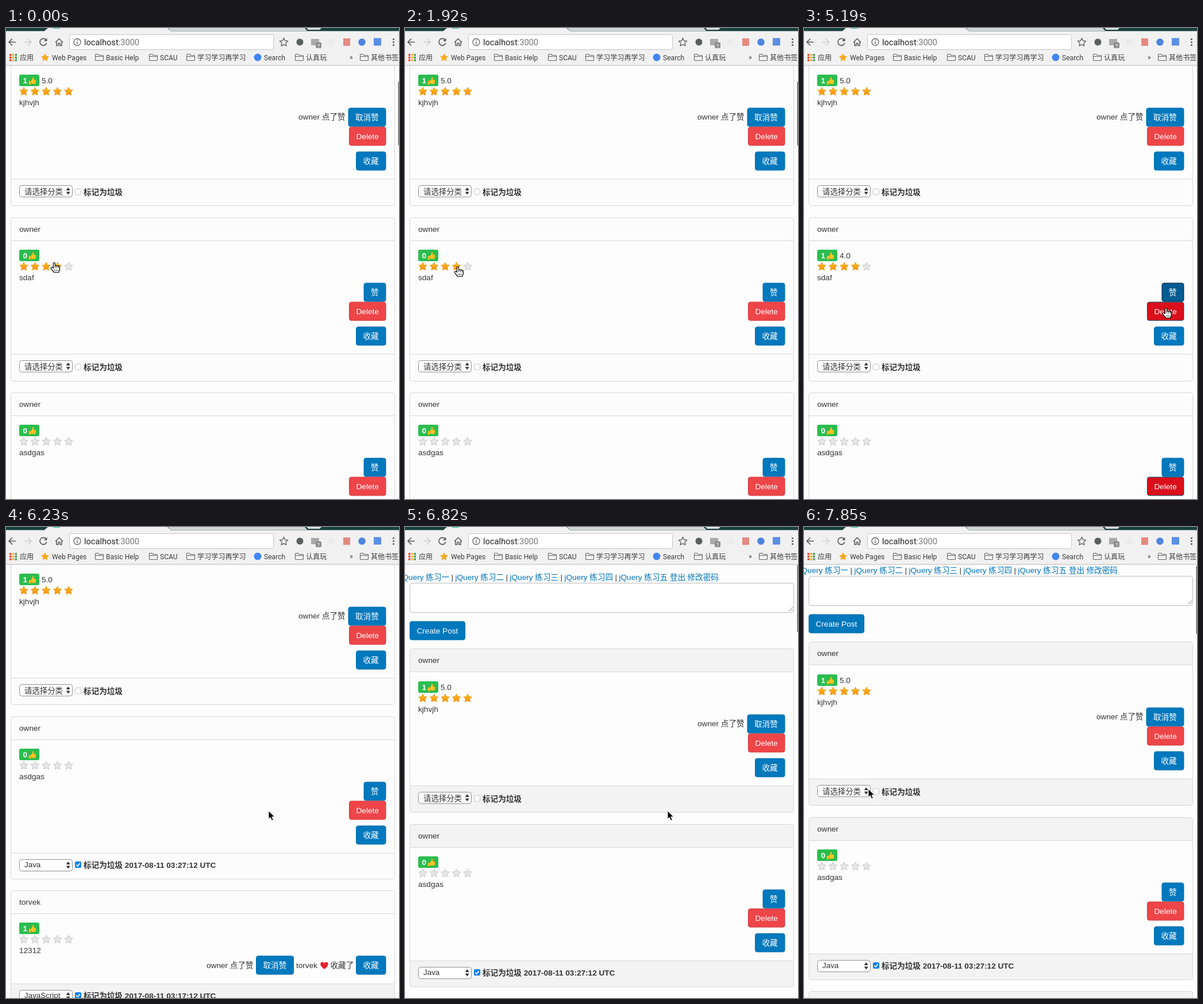
Recreate the animation shown at these times as an HTML page. Size 684 px wide and 818 px high, loop 7990 ms.

```html
<!DOCTYPE html>
<html lang="zh-CN">
<head>
<meta charset="utf-8">
<title>Posts</title>
<style>
html, body { margin: 0; width: 100%; height: 100%; overflow: hidden; background: #fdfdfd; }
svg { display: block; }
text { font: 13.6px "Liberation Sans", "Noto Sans CJK SC", "Noto Sans CJK", sans-serif; fill: #333; white-space: pre; }
.b { font-weight: bold; }
.w { fill: #fff; }
.link { fill: #0275b8; }
.bar text { font: 12.1px Roboto, "Noto Sans CJK SC", "Noto Sans CJK", sans-serif; fill: #3c3c3c; }
.url text { font: 14.6px Roboto, sans-serif; fill: #222; }
.frame { fill: none; stroke: #d8d8d8; }
.shade { fill: #fcfcfc; }
.gray .shade, .shade.on { fill: #f3f3f3; }
.star { fill: #e6e6e6; stroke: #c6c6c6; stroke-linejoin: round; }
.star.lit { fill: url(#gold); stroke: #ee9a1d; }
.btn { fill: #0278bd; stroke: #026fae; }
.btn.red { fill: #ee4549; stroke: #d3383c; }
.red.hover { fill: #d9101c; stroke: #b00d17; }
.btn.hover { stroke: #034a75; }
.like.hover, .like.focus { fill: #045c92; }
.like.press { fill: #04456c; }
.like.press, .like.focus { stroke: #03253b; }
</style>
</head>
<body>
<svg id="stage" width="684" height="818" viewBox="0 0 684 818"></svg>
<script>
const LOOP = 7990;
const stage = document.getElementById('stage');

const text = (x, y, s, cls = '') => `<text x="${x}" y="${y}" class="${cls}">${s}</text>`;
const rect = (x, y, w, h, attrs) => `<rect x="${x}" y="${y}" width="${w}" height="${h}" ${attrs}/>`;
const path = (d, attrs) => `<path d="${d}" ${attrs}/>`;
const move = (x, y, s, attrs = '') => `<g transform="translate(${x} ${y})" ${attrs}>${s}</g>`;
const many = (n, f) => Array.from({ length: n }, (_, i) => f(i)).join('');

function starPath(cx, cy, r) {
  const pts = Array.from({ length: 10 }, (_, i) => {
    const a = i * Math.PI / 5 - Math.PI / 2, k = i % 2 ? r * 0.5 : r;
    return (cx + k * Math.cos(a)).toFixed(2) + ' ' + (cy + k * Math.sin(a)).toFixed(2);
  });
  return 'M' + pts.join('L') + 'Z';
}

const button = (x, y, w, label, cls = '', tx = x + 12.5) =>
  rect(x + .5, y + .5, w - 1, 32, `rx="3.5" class="btn ${cls}"`) + text(tx, y + 21.5, label, 'w');

const thumb = path('M40 66.5h3v6h-3zM43.5 66.5l2.4-3.2.5-3.3q2.2-.3 2 2.2l-.4 2.3h3.2q1.4.5.6 1.8.8.9 0 1.8.5 1-.3 1.7.3 1.5-1.2 1.7h-4.3l-2.5-.9z',
  'fill="#fdc526" stroke="#e9a018" stroke-width=".5"');
const heart = path('M554 136.5q-7-5-6.8-9.2.4-3.3 3.4-3.4 2.2 0 3.4 2.2 1.2-2.2 3.4-2.2 3 .1 3.4 3.4.2 4.2-6.8 9.2z', 'fill="#e9222b"');

function footer(y, post) {
  const d = post.date ? 0 : 2;
  const tick = post.date
    ? rect(120, y + 14.5, 11, 11, 'rx="2" fill="#1580f0"') + path(`M122.5 ${y + 20}l2.3 2.6 3.8-5.4`, 'fill="none" stroke="#fff" stroke-width="1.6"')
    : rect(120.5, y + 17, 10, 10, 'rx="2" fill="#fff" stroke="#c4c4c4"');
  return rect(23.5, y + 11, 92, 20, 'rx="4" fill="#fff" stroke="#8f8f8f"') +
    `<text x="32" y="${y + 24.5 + d * .8}" style="font-size:13.4px">${post.kind || '请选择分类'}</text>` +
    path(`M104.7 ${y + 19.5}h7l-3.5-5zM104.7 ${y + 22}h7l-3.5 5z`, 'fill="#333"') + tick +
    text(135, y + 25 + d, '标记为垃圾' + (post.date ? ` 2017-08-11 ${post.date} UTC` : ''), 'b');
}

function card(post) {
  const foot = post.faved ? 162 : 237, h = foot + (post.date ? 45 : 47), d = post.shift || 0;
  const row = post.liked
    ? (post.faved
      ? text(349, 134, 'owner 点了赞') + button(435, 113, 66, '取消赞') + text(505, 134, 'torvek') + heart + text(564.5, 134, '收藏了')
      : text(509, 133.5, 'owner 点了赞') + button(595.5, 113, 66, '取消赞'))
    : button(622.5, 113, 39, '赞', 'like');
  const tail = post.faved
    ? button(609, 113, 52.5, '收藏')
    : button(597, 146, 64.5, 'Delete', 'red') + button(609, 189, 52.5, '收藏');
  const body =
    rect(23, 55.5, 35, 20, 'rx="3" fill="#2bbd4f"') + text(29.5, 70, post.count, 'w b count') + thumb +
    text(62, 70, post.rate, 'rate') +
    many(5, i => path(starPath(31 + 19.5 * i, 85, 7.6), `class="star ${i < post.stars ? 'lit' : ''}"`)) +
    text(23, 108.5, post.title) + row + tail +
    rect(9, foot, 667.5, h - foot - d, `class="shade ${post.faved ? 'on' : ''}"`) +
    path(`M9 ${foot}h667.5`, 'class="frame"') + footer(foot, post);
  return move(0, post.top,
    rect(8.5, 0, 668, h, 'rx="4" fill="#fdfdfd"') + rect(9, .5, 667, 39.5, 'class="shade"') +
    path('M9 40h667.5', 'class="frame"') + text(23, 24.5, post.by || 'owner') + move(0, d, body) +
    rect(8.5, 0, 668, h, 'rx="4" class="frame"'), `id="${post.title}" style="--x:0"`).replace(`id="${post.title}"`, `id="p-${post.title}"`);
}

const posts = [
  { title: 'kjhvjh', top: 24.5, shift: 1, count: 1, rate: '5.0', stars: 5, liked: true },
  { title: 'sdaf', top: 329.5, count: 0, rate: '', stars: 4 },
  { title: 'asdgas', top: 0, count: 0, rate: '', stars: 0, kind: 'Java', date: '03:27:12' },
  { title: '12312', top: 302, by: 'torvek', count: 1, rate: '', stars: 0, liked: true, faved: true, kind: 'JavaScript', date: '03:17:12' }
].map(card);

const nav = many(5, i => text(-7.5 + 95 * i, -95.5, 'jQuery 练习' + '一二三四五'[i], 'link') +
    (i < 4 ? text(80.5 + 95 * i, -95.5, '|') : '')) +
  text(461, -95.5, '登出', 'link') + text(491.5, -95.5, '修改密码', 'link') +
  rect(8.5, -89.5, 668, 51, 'rx="4" fill="#fff" stroke="#bdbdbd"') +
  path('M668 -41l7-7M672 -41l3-3', 'stroke="#888"') + button(8, -23.5, 97, 'Create Post');

const folder = x => path(`M${x + .5} 46.5q0-1 1-1h4l1.5 2h6.5q1 0 1 1v7q0 1-1 1h-12q-1 0-1-1zM${x + .5} 49.5h14`, 'fill="none" stroke="#666" stroke-width="1.1"');
const dots = ['#e8453c', '#f6b42c', '#3f9d54', '#4383ee'];
const marks = [[174, 'Basic Help'], [268, 'SCAU'], [333, '学习学习再学习'], [522, '认真玩'], [635, '其他书签']];
const icon = 'fill="none" stroke="#5a5a5a" stroke-width="1.7"';

const chrome = rect(0, 0, 684, 65, 'fill="#f2f1f2"') +
  rect(0, 0, 684, 5.5, 'fill="#17413f"') +
  path('M66 6l7-6H281l7 6z', 'fill="#f2f1f2"') +
  path('M288 6l-6-6H520l5 6z', 'fill="#cfd6d5"') + path('M281 0l7 5.5', 'stroke="#999"') +
  path('M523 0h26l-3 3h-20z', 'fill="#dfe4e3"') + rect(82, 0, 12, 1.2, 'fill="#35c5b5"') +
  path('M0 5.5h67M288 5.5h396', 'stroke="#a9adad"') +
  path('M17 24.5H6M11 18.5l-6 6 6 6', icon) +
  path('M32 24.5h11M38 18.5l6 6-6 6', icon.replace('#5a5a5a', '#cfcfcf')) +
  path('M70 21a6 6 0 1 0 .8 5', icon) + path('M71.5 17.5v5.5h-5.5z', 'fill="#5a5a5a"') +
  path('M86 25l6.5-6.5 6.5 6.5M88 24v6.5h3v-4h3v4h3v-6.5', icon.replace('1.7', '1.5')) +
  rect(110.5, 11.5, 355, 26, 'rx="3" fill="#fff" stroke="#c6c6c6"') +
  '<circle cx="124" cy="24.5" r="6" fill="none" stroke="#666" stroke-width="1.3"/>' +
  path('M124 23.5v4.5M124 20.8v1.5', 'stroke="#666" stroke-width="1.4"') +
  '<g class="url"><text x="136" y="29.5">localhost<tspan fill="#777">:3000</tspan></text></g>' +
  path(starPath(483.5, 25, 7.3), icon.replace('1.7', '1.3')) +
  '<circle cx="511.5" cy="24.5" r="6" fill="#5b605f"/>' +
  rect(531, 19, 14, 11, 'fill="#a9a9a9"') + rect(539, 25, 10, 10, 'rx="2" fill="#8c8c8c"') +
  `<text x="541.5" y="33.5" class="w" style="font-size:9px">?</text>` +
  rect(560, 19, 11, 11, 'fill="#ececec"') +
  rect(587, 18, 12, 13, 'fill="#e58a80"') +
  '<circle cx="619.5" cy="24.5" r="6.3" fill="#4c86e0"/>' + rect(640, 17.5, 13, 13, 'fill="#5a8fe4"') +
  many(3, i => `<circle cx="674.5" cy="${19.5 + i * 5}" r="1.6" fill="#5a5a5a"/>`) +
  many(9, i => rect(6 + i % 3 * 4.8, 45 + (i / 3 | 0) * 4.6, 3.4, 3.4, `fill="${dots[(i + (i / 3 | 0)) % 4]}"`)) +
  path(starPath(68, 51.5, 7.5), 'fill="#f6a820"') +
  '<circle cx="438" cy="51" r="6.5" fill="#4285f4"/>' +
  `<g class="bar">${text(24, 55.5, '应用')}${text(80, 55.5, 'Web Pages')}${text(449, 55.5, 'Search')}${text(598, 55, '»')}` +
  marks.map(([x, s]) => folder(x - 19) + text(x, 55.5, s)).join('') + '</g>' +
  path('M0 65h684', 'stroke="#b9b9b9"');

const arrow = path('M0 0V14.2L3.3 11.3 5.7 16.8 8.2 15.7 5.9 10.3H10.4Z', 'fill="#000" stroke="#fff" stroke-width=".9"');
const hand = path('M-1.6 10V1.4Q-.1-.9 1.4 1.4V6Q3-.2+5 4.4 6.4Q6.2 5 7.2 7Q9.2 6 9.4 8.4V12.5L7.8 17.5H-.2L-5.6 10.8Q-5.8 8.2-3.6 8.6Z'.replace('3-.2+5', '3 5'),
  'fill="#fff" stroke="#000" stroke-width="1.2" stroke-linejoin="round"') + path('M1.4 6v4M4.4 6.6v3.4M7.2 7.4v3M1 12.5v3M3.5 12.5v3M6 12.5v3', 'stroke="#000" stroke-width=".8"');

stage.innerHTML = `<defs><linearGradient id="gold" x2="0" y2="1"><stop stop-color="#ffc32a"/><stop offset="1" stop-color="#f78a00"/></linearGradient>
  <clipPath id="view"><rect y="65" width="684" height="753"/></clipPath></defs>
  <rect width="684" height="818" fill="#fdfdfd"/>
  <g clip-path="url(#view)"><g id="page">${nav}${posts[0]}${posts[1]}<g id="rest">${posts[2]}${posts[3]}</g></g></g>
  ${chrome}${rect(682.5, 93, 3, 111, 'id="thumb" rx="1" fill="#6d6d6d"')}
  <g id="arrow">${arrow}</g><g id="hand">${hand}</g>`;

const el = q => stage.querySelector(q);
const page = el('#page'), rest = el('#rest'), bar = el('#thumb');
const post = el('#p-sdaf'), like = post.querySelector('.like');
const stars = post.querySelectorAll('.star');
const deletes = [post, el('#p-asdgas')].map(p => p.querySelector('.red'));

// time, x, y of the pointer tip
const pointer = [
  [0, 84, 407], [290, 122, 412], [440, 205, 424], [590, 320, 452], [740, 450, 500], [890, 535, 550],
  [1030, 440, 515], [1180, 240, 455], [1330, 72, 411], [1480, 78, 412], [1630, 85, 413], [1780, 91, 414],
  [1920, 92, 414], [2810, 112, 420], [2960, 235, 440], [3110, 425, 455], [3260, 570, 460], [3400, 632, 457],
  [3550, 635, 455], [4590, 637, 459], [4740, 636, 465], [4890, 634, 472], [5040, 631, 481], [5190, 630, 486],
  [6080, 560, 489], [6230, 457, 493], [7120, 440, 490], [7260, 370, 480], [7410, 250, 466], [7550, 135, 457],
  [7700, 83, 455], [7850, 112, 455]
];
const scroll = [[0, 0], [6680, 75], [6820, 187], [6970, 180], [7120, 177], [7260, 175]];
const at = (steps, t) => steps.findLast(s => s[0] <= t);
const place = (node, x, y) => node.setAttribute('transform', `translate(${x} ${y})`);
const show = (node, on) => { node.style.display = on ? '' : 'none'; };

function draw(t) {
  const [, x, y] = at(pointer, t), s = at(scroll, t)[1];
  const gone = t >= 5640;
  const onStars = t < 2810 && x < 118 && y < 423;
  const onLike = t >= 3400 && y < 475 && !gone;
  const onDelete = t >= 5040 && t < 6080;
  const isHand = onStars || onDelete || (onLike && (t < 3550 || t >= 3700));

  place(page, 0, s);
  page.classList.toggle('gray', t >= 6680);
  show(post, !gone);
  place(rest, 0, gone ? 329.5 : 633.5);

  const lit = t >= 2220 ? 4 : onStars ? Math.ceil((x - 21) / 19.5) : 0;
  stars.forEach((n, i) => n.classList.toggle('lit', i < lit));
  post.querySelector('.rate').textContent = t >= 2220 ? '4.0' : '';
  post.querySelector('.count').textContent = t >= 3700 ? 1 : 0;
  like.classList.toggle('hover', onLike);
  like.classList.toggle('press', t >= 3550 && t < 3700);
  like.classList.toggle('focus', t >= 3700);
  deletes.forEach(n => n.classList.toggle('hover', onDelete));

  show(bar, t < 2960 || t >= 6680);
  bar.setAttribute('y', 93 - s * .145);
  bar.setAttribute('height', s > 175 ? 116 : 111 + s * .04);

  const node = el(isHand ? '#hand' : '#arrow');
  show(el('#hand'), isHand);
  show(el('#arrow'), !isHand);
  place(node, x, y);
}

const start = performance.now();
function tick() {
  draw((performance.now() - start) % LOOP);
  requestAnimationFrame(tick);
}
tick();
</script>
</body>
</html>
```
